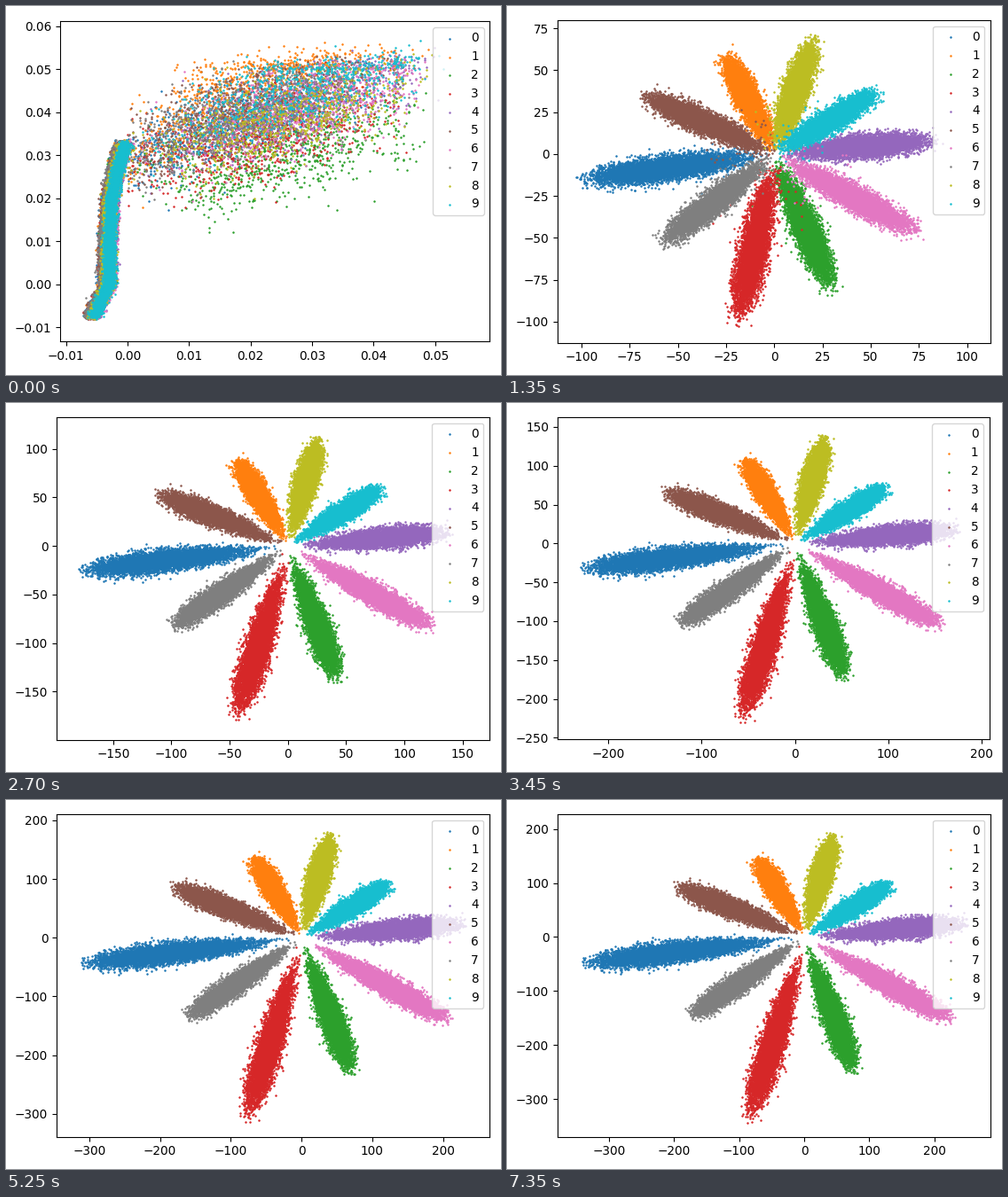
Recreate the animation shown at these times as a matplotlib script. Size 558 by 416 pixels, loop 7.5 s.

```python
import numpy as np
import matplotlib.pyplot as plt
from matplotlib.animation import FuncAnimation

W, H = 558, 416
AX_W, AX_H = 496, 369.6
LEFT, TOP, PAD, RIGHT = 49, 12.7, 10, 13
FRAMES, STEP = 50, 150
CLASSES, N, CLOUD_N = 10, 6000, 750

# training progress: 0 early, 1 spread out, 2 fully grown
EPOCHS = [1, 5, 14, 23, 35, 43, 49]
PROGRESS = [-0.44, 0, 1, 1.444, 1.855, 1.964, 2]
SCALES = np.array([.208, .407, 1])
# xmin, xmax, ymin, ymax at progress 0, 1 and 2
LIMITS = np.array([
    [-78.9, 85.6, -76.5, 56.2],
    [-154.4, 145.4, -157.7, 109.6],
    [-379, 286.5, -370, 228],
])
START_LIMITS = (-0.0110, 0.05886, -0.0133, 0.0612)

# final direction and length of each petal
THETA = np.radians([188, 116, -73, 256, 6, 154, -34, 220, 77, 37])
LENGTH = np.array([337, 163, 257, 342, 246, 216, 270, 227, 192, 165])
LONGEST = 337

# first epoch: a shared narrow stem and a loose cloud
STEM_Y = [-.0074, -.0026, 0, .0093, .0197, .0269, .0328]
STEM_X = [-.0058, -.0042, -.0033, -.0033, -.0029, -.0019, -.0007]
CLOUD_LIFT = [.001, .009, -.011, -.005, .001, .003, -.001, .001, -.002, .004]

rng = np.random.default_rng(7)
along = 1.06 * rng.beta(4.5, 3.5, (CLASSES, N))
across = rng.normal(size=(CLASSES, N)) / 2.9
jitter = rng.normal(size=(CLASSES, N, 2))
stray = rng.random((CLASSES, N)) < 0.005
stray_class = rng.integers(0, CLASSES, (CLASSES, N))


def mix(keys, s):
    if s < 1:
        return keys[0] + (keys[1] - keys[0]) * s
    return keys[1] + (keys[2] - keys[1]) * (s - 1)


def soft_cap(v, cap, rate):
    return np.where(v > cap, cap + (v - cap) * rate, v)


def first_epoch(c):
    lean = np.cos(THETA[c])
    y = rng.uniform(STEM_Y[0], STEM_Y[-1], N - CLOUD_N)
    x = np.interp(y, STEM_Y, STEM_X) + .0004 * lean
    x += rng.normal(0, .00045, y.size)
    y += rng.normal(0, .0004, y.size)
    cx = np.abs(rng.normal(.0235 + .006 * lean, .0105, CLOUD_N))
    cx = soft_cap(cx, .043, .4)
    cy = .0295 + .43 * cx + CLOUD_LIFT[c] * np.minimum(1, cx / .012)
    cy = soft_cap(cy + rng.normal(0, .0047, CLOUD_N), .050, .4)
    return np.column_stack([np.r_[x, cx], np.r_[y, cy]])


opening = [first_epoch(c) for c in range(CLASSES)]


def petals(s):
    """Cones of points that lengthen, narrow and separate with progress."""
    early = np.clip(1 - s, 0, 1)
    scale = mix(SCALES, s)
    angle = THETA - np.radians(6) * early * np.sin(THETA)
    unit = np.stack([np.cos(angle), np.sin(angle)], axis=1)
    normal = np.stack([-unit[:, 1], unit[:, 0]], axis=1)
    rel = LENGTH / LONGEST
    reach = LONGEST * scale * rel ** np.interp(s, [0, 1, 2], [.5, .75, 1])
    width = 26 * scale ** .85 * rel ** .3

    t = along ** (1 + .25 * early)
    bulge = (t / .7) ** (.7 - .3 * early) * ((1.1 - t) / .4) ** .4
    r = t * reach[:, None]
    side = across * bulge * width[:, None]
    pts = r[..., None] * unit[:, None] + side[..., None] * normal[:, None]
    pts += jitter * np.interp(s, [0, 1, 1.5], [1.5, 1.2, .4])

    lost = (stray * early)[..., None]
    other = (0.5 * r)[..., None] * unit[stray_class] + 2 * jitter
    return pts * (1 - lost) + other * lost


fig = plt.figure(figsize=(W / 100, H / 100), dpi=100)
ax = fig.add_axes([0, 0, 1, 1])
dots = [ax.scatter([], [], s=1, color=f"C{c}", label=str(c))
        for c in range(CLASSES)]


def place(k, left, top):
    ax.set_position([left / W, 1 - (top + AX_H * k) / H,
                     AX_W * k / W, AX_H * k / H])
    ax.tick_params(labelsize=10 * k, length=3.5 * k, width=.8 * k, pad=3.5 * k)


def fit():
    """Shrink the plot so that its tick labels just fit the page width."""
    place(1, LEFT, TOP)
    left = LEFT - ax.yaxis.get_tightbbox().x0 + PAD
    overhang = ax.xaxis.get_tightbbox().x1 - LEFT - AX_W
    k = W / (left + AX_W + max(RIGHT, overhang + PAD))
    place(k, left * k, TOP * k + H * (1 - k) / 2)
    for spine in ax.spines.values():
        spine.set_linewidth(.8 * k)
    for d in dots:
        d.set_sizes([k * k])
        d.set_linewidth(.8 * k)
    ax.legend(loc="upper right", fontsize=10 * k)


def update(i):
    if i == 0:
        limits, points = START_LIMITS, opening
    else:
        s = np.interp(i, EPOCHS, PROGRESS)
        limits, points = mix(LIMITS, s), petals(s)
    ax.set_xlim(limits[0], limits[1])
    ax.set_ylim(limits[2], limits[3])
    for d, p in zip(dots, points):
        d.set_offsets(p)
    fit()
    return dots


anim = FuncAnimation(fig, update, frames=FRAMES, interval=STEP,
                     repeat=True, repeat_delay=0, blit=False)
plt.show()
```
